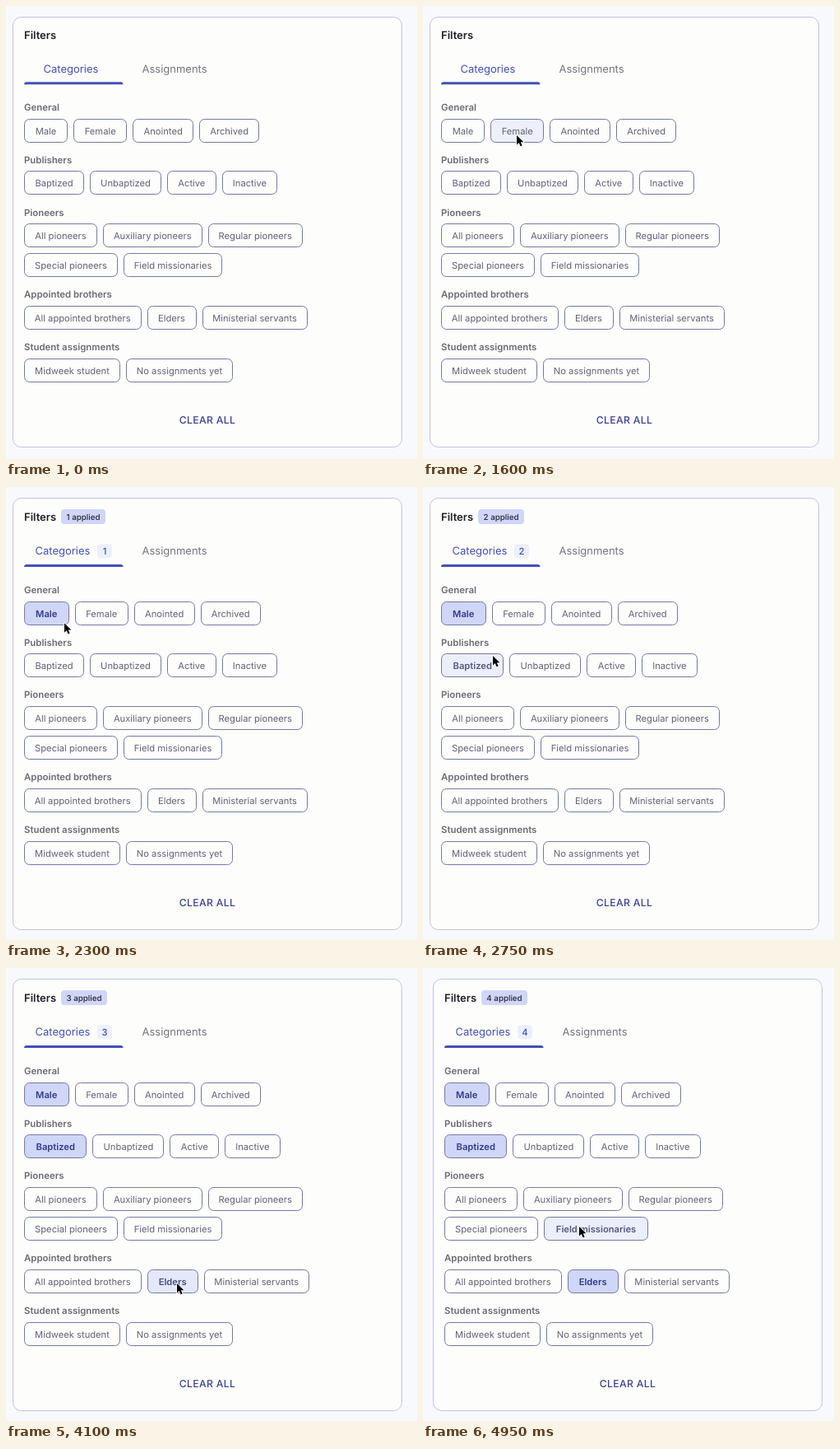
An HTML page with a canvas for the animation above (5 s loop, 500x550 px).

```html
<!DOCTYPE html>
<html lang="en">
<head>
<meta charset="utf-8">
<title>Filters</title>
<style>
html, body { margin: 0; width: 100%; height: 100%; overflow: hidden; background: #f8f9fd; }
canvas { display: block; width: 500px; height: 550px; }
</style>
</head>
<body>
<canvas></canvas>
<script>
const canvas = document.querySelector('canvas');
const ctx = canvas.getContext('2d');
const ratio = window.devicePixelRatio || 1;
canvas.width = 500 * ratio;
canvas.height = 550 * ratio;
ctx.textRendering = 'geometricPrecision';

const LOOP = 5000, FADE = 250, CHIP_H = 29, GAP = 7;
const BLUE = '#4450b4';
const headings = [
  ['General', 123], ['Publishers', 186.7], ['Pioneers', 250.5],
  ['Appointed brothers', 350], ['Student assignments', 413.7]
];
// Each row: top, then [label, width] pairs.
const rows = [
  [136.8, ['Male', 53], ['Female', 65.3], ['Anointed', 73.7], ['Archived', 73.3]],
  [200.4, ['Baptized', 73], ['Unbaptized', 87], ['Active', 59.7], ['Inactive', 67.5]],
  [264.2, ['All pioneers', 89], ['Auxiliary pioneers', 120.5], ['Regular pioneers', 115.5]],
  [300.1, ['Special pioneers', 114], ['Field missionaries', 120]],
  [363.9, ['All appointed brothers', 142.5], ['Elders', 60], ['Ministerial servants', 128]],
  [427.8, ['Midweek student', 117], ['No assignments yet', 130]]
];
// Click time and the extra width of the bold label.
const clicks = {
  'Male': [1890, 1.5],
  'Baptized': [2690, 3.4],
  'Elders': [3970, 2.2],
  'Field missionaries': [4890, 7]
};
// Pointer stops: time, x, y.
const path = [
  [1000, 330, 330], [1500, 114, 157], [1640, 114, 157], [1850, 66, 151],
  [2150, 66, 151], [2600, 85, 205], [2970, 85, 205], [3600, 208, 383],
  [4230, 208, 383], [4720, 190, 314], [5000, 190, 314]
];

const clamp = v => Math.max(0, Math.min(1, v));
const smooth = v => (v = clamp(v), v * v * (3 - 2 * v));
const mix = (a, b, p) => `rgb(${a.map((v, i) => Math.round(v + (b[i] - v) * p))})`;

function pointer(t) {
  if (t < path[0][0]) return null;
  const i = Math.max(1, path.findIndex(stop => stop[0] >= t));
  const [t0, x0, y0] = path[i - 1], [t1, x1, y1] = path[i];
  const p = smooth((t - t0) / (t1 - t0));
  return [x0 + (x1 - x0) * p, y0 + (y1 - y0) * p];
}

// Share of the last 200 ms that the pointer spent inside the box.
function hover(t, x, y, w, h) {
  let hits = 0;
  for (let k = 0; k < 10; k++) {
    const at = pointer(t - k * 20);
    if (at && at[0] > x && at[0] < x + w && at[1] > y && at[1] < y + h) hits++;
  }
  return hits / 10;
}

function text(label, x, y, size, weight, color, align = 'center') {
  ctx.font = `${weight} ${size}px Inter, sans-serif`;
  ctx.textAlign = align;
  ctx.fillStyle = color;
  ctx.fillText(label, x, y + size * 0.364);
}

function box(x, y, w, h, r, fill, stroke) {
  ctx.beginPath();
  ctx.roundRect(x, y, w, h, r);
  if (fill) { ctx.fillStyle = fill; ctx.fill(); }
  if (stroke) { ctx.strokeStyle = stroke; ctx.lineWidth = 1; ctx.stroke(); }
}

function drawChip(t, shift, label, x, y, w) {
  const click = clicks[label];
  const on = click && t >= click[0];
  const chosen = on ? clamp((t - click[0]) / FADE) : 0;
  const tint = Math.max(0.4 * hover(t, x + shift, y, w, CHIP_H), chosen);
  const left = Math.round(x), top = Math.round(y), right = Math.round(x + w);
  box(left + 0.5, top + 0.5, right - left - 1, CHIP_H - 1, 6,
    `rgba(208,214,247,${tint})`, '#7578a4');
  text(label, x + w / 2, top + CHIP_H / 2, 11.2, on ? 600 : 400,
    mix([98, 98, 120], [50, 58, 140], chosen));
}

function drawTabs(t, drop, count) {
  const open = smooth((t - clicks.Male[0]) / FADE);
  const middle = 79 - 10 * open, y = 76 + drop;
  text('Categories', middle, y, 13, 400, BLUE);
  text('Assignments', 205, y, 13, 400, '#75757c');
  if (count) {
    ctx.globalAlpha = open;
    box(middle + 42, y - 8.5, 18, 17, 4, '#ebf0fc');
    text(count, middle + 51, y, 11.2, 500, BLUE);
    ctx.globalAlpha = 1;
  }
  box(22, 92.3 + drop, 120.5, 3, [3, 3, 0, 0], BLUE);
}

function drawPointer(x, y) {
  ctx.beginPath();
  [[0, 0], [0, 11.5], [2.7, 9], [4.6, 13.3], [6.6, 12.4], [4.8, 8.3], [8.4, 8.3]]
    .forEach(([dx, dy]) => ctx.lineTo(x + dx, y + dy));
  ctx.closePath();
  ctx.lineJoin = 'round';
  ctx.lineWidth = 1.6;
  ctx.strokeStyle = '#fff';
  ctx.stroke();
  ctx.fillStyle = '#000';
  ctx.fill();
}

function draw(t) {
  const count = Object.values(clicks).filter(c => t >= c[0]).length;
  const drop = count ? 1.7 : 0;
  const shift = count === 4 ? 4 : 0;

  ctx.setTransform(ratio, 0, 0, ratio, 0, 0);
  ctx.fillStyle = '#f8f9fd';
  ctx.fillRect(0, 0, 500, 550);
  ctx.save();
  ctx.translate(shift, 0);
  box(8.5, 13.5, 473, Math.round(522 + drop), 10, '#fdfdfc', '#bfc3e2');

  text('Filters', 22, 35 + drop / 2, 13, 600, '#1f1f24', 'left');
  if (count) {
    const w = count > 1 ? 56 : 54;
    box(67, 27, w, 18, 4, '#d0d6f7');
    text(count + ' applied', 67 + w / 2, 36, 9.75, 500, '#26263a');
  }
  drawTabs(t, drop, count);
  for (const [label, y] of headings) text(label, 22, y + drop, 11.4, 600, '#6b6b72', 'left');
  for (const [top, ...chips] of rows) {
    let x = 22;
    for (const [label, width] of chips) {
      const click = clicks[label];
      const w = width + (click && t >= click[0] ? click[1] : 0);
      drawChip(t, shift, label, x, top + drop, w);
      x += w + GAP;
    }
  }
  ctx.letterSpacing = '0.35px';
  text('CLEAR ALL', 245, 503 + drop, 12.2, 500, '#3a4090');
  ctx.letterSpacing = '0px';
  ctx.restore();

  const at = pointer(t);
  if (at) drawPointer(...at);
}

const start = performance.now();
function frame() {
  draw((performance.now() - start) % LOOP);
  requestAnimationFrame(frame);
}
frame();
</script>
</body>
</html>
```
